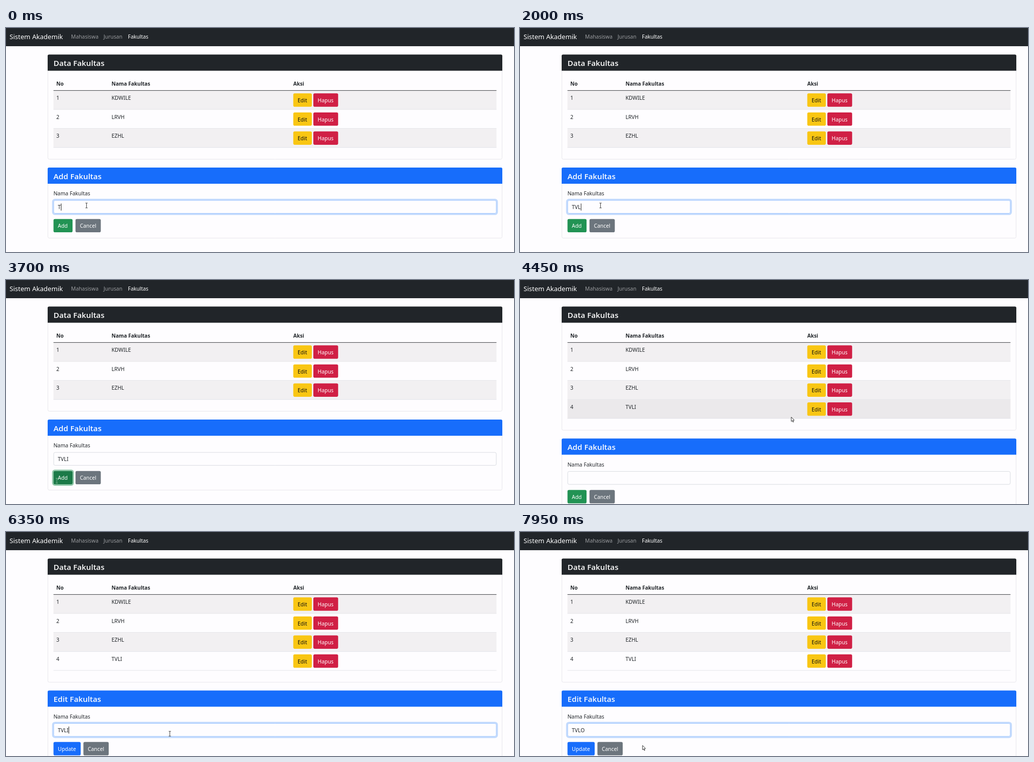
An HTML page with a canvas that plays this animation: 1000 px wide and 443 px high, repeating every 8000 ms.

```html
<!DOCTYPE html>
<html lang="id">
<head>
<meta charset="utf-8">
<title>Sistem Akademik</title>
<style>
  html, body { margin: 0; width: 100%; height: 100%; overflow: hidden; background: #fefdff; }
  canvas { display: block; width: 1000px; height: 443px; }
</style>
</head>
<body>
<canvas id="stage" width="1000" height="443"></canvas>
<script>
const ctx = document.getElementById('stage').getContext('2d');
const LOOP = 8000;
const ROW = 37.6;
const FACULTIES = ['KDWILE', 'LRVH', 'EZHL', 'TVLI'];
const INK = '#212529', BLUE = '#176dfb', GREEN = '#229354';
const RED = '#d02045', YELLOW = '#f9c613', GREY = '#6c757d';
const REGULAR = '10.36px "Noto Sans", sans-serif';
const BOLD = 'bold 10.1px "Noto Sans", sans-serif';
const BRAND = '13.06px "Noto Sans", sans-serif';
const TITLE = '600 15.2px "Open Sans", sans-serif';

// Moments of the user's actions, in ms
const PRESS_ADD = 3550, ROW_ADDED = 4000, EDIT_OPEN = 4850, FOCUS_EDIT = 6050;

// [time, typed value]
const TYPING = [
  [0, 'T'], [700, 'TV'], [1500, 'TVL'], [2250, 'TVLI'], [ROW_ADDED, ''],
  [EDIT_OPEN, 'TVLI'], [6900, 'TVL'], [7250, 'TVLO']
];

// [time, x, y] of the mouse pointer
const PATH = [
  [0, 158.5, 351], [2600, 158.5, 351], [3250, 100, 397], [3950, 100, 397],
  [4400, 533.5, 270.5], [4470, 533.5, 270.5], [4700, 580, 257], [4900, 580, 257],
  [5250, 447.8, 334], [5900, 322.5, 399], [7300, 322.5, 399], [7850, 240.7, 421.5],
  [LOOP, 240.7, 421.5]
];

function pointerAt(t) {
  const i = PATH.findIndex((p, n) => n > 0 && t <= p[0]);
  const [t0, x0, y0] = PATH[i - 1], [t1, x1, y1] = PATH[i];
  const u = (t - t0) / (t1 - t0), e = u * u * (3 - 2 * u);
  return { x: x0 + (x1 - x0) * e, y: y0 + (y1 - y0) * e };
}

const inside = (p, x, y, w, h) => p.x >= x && p.x <= x + w && p.y >= y && p.y <= y + h;

function rect(x, y, w, h, color) {
  ctx.fillStyle = color;
  ctx.fillRect(x, y, w, h);
}

function box(x, y, w, h, r, fill, stroke, line = 1) {
  ctx.beginPath();
  ctx.roundRect(x, y, w, h, r);
  if (fill) { ctx.fillStyle = fill; ctx.fill(); }
  if (stroke) { ctx.strokeStyle = stroke; ctx.lineWidth = line; ctx.stroke(); }
}

function text(str, x, y, color = INK, font = REGULAR) {
  ctx.font = font;
  ctx.fillStyle = color;
  ctx.fillText(str, x, y);
}

function button(label, x, y, w, fill, color = '#fff') {
  box(x, y, w, 26.4, 2.8, fill);
  text(label, x + 8.6, y + 17.6, color);
}

function card(y, h, title, color) {
  box(82.5, y + 0.5, 894, h, 2.8, null, '#e2e1e6', 0.8);
  box(82, y, 895, 32, [2.8, 2.8, 0, 0], color);
  text(title, 93.5, y + 22.5, '#fff', TITLE);
}

function navbar() {
  rect(0, 0, 1000, 36, INK);
  text('Sistem Akademik', 7, 22, '#fff', BRAND);
  text('Mahasiswa', 128, 21, '#9a9c9f');
  text('Jurusan', 192, 21, '#9a9c9f');
  text('Fakultas', 240, 21, '#fff');
}

function table(count, pointer, lightEdit) {
  card(52.5, 206.5 + (count - 3) * ROW, 'Data Fakultas', INK);
  text('No', 99, 114, INK, BOLD);
  text('Nama Fakultas', 207.7, 114, INK, BOLD);
  text('Aksi', 565.5, 114, INK, BOLD);
  for (let i = 0; i < count; i++) {
    const y = 123.7 + i * ROW;
    const hovered = inside(pointer, 93.5, y, 872, ROW);
    if (hovered) rect(93.5, y, 872, ROW, '#ebe9eb');
    else if (i % 2 === 0) rect(93.5, y, 872, ROW, '#f2f0f2');
    rect(93.5, y + ROW - 0.7, 872, 0.8, '#dee0e4');
    text(i + 1, 99, y + 18.5);
    text(FACULTIES[i], 207.7, y + 18.5);
    button('Edit', 565.5, y + 5.6, 36.5, lightEdit && i === 3 ? '#facb24' : YELLOW, '#111');
    button('Hapus', 605, y + 5.6, 48.8, RED);
  }
  rect(93.5, 123.1, 872, 1, '#3d4043');
}

function field(value, y, focused, caretOn) {
  if (focused) box(92.1, y - 1.4, 874.8, 29.2, 4.2, null, '#c2dafd', 2.8);
  box(93.9, y + 0.4, 871.2, 25.6, 2.8, '#fefdff', focused ? '#86b7fe' : '#d0d4da', 0.8);
  text(value, 102, y + 17.6);
  if (focused && caretOn) rect(102.3 + ctx.measureText(value).width, y + 6.5, 1, 14, '#222');
}

function drawIBeam(x, y, color) {
  ctx.strokeStyle = color;
  ctx.lineWidth = 0.9;
  ctx.beginPath();
  for (const s of [-1, 1]) {
    ctx.moveTo(x - 2.2, y + 4.8 * s);
    ctx.lineTo(x + 2.2, y + 4.8 * s);
  }
  ctx.moveTo(x, y - 4.8);
  ctx.lineTo(x, y + 4.8);
  ctx.stroke();
}

function drawShape(x, y, points) {
  ctx.beginPath();
  for (const [dx, dy] of points) ctx.lineTo(x + dx, y + dy);
  ctx.closePath();
  ctx.fillStyle = '#fff';
  ctx.strokeStyle = '#222';
  ctx.lineWidth = 0.9;
  ctx.fill();
  ctx.stroke();
}

const ARROW = [[0.5, 0.5], [0.5, 9.2], [2.5, 7.5], [3.9, 10.6], [5.2, 10], [3.9, 7], [6.4, 6.7]];
const HAND = [[-1, 0], [1, 0], [1, 4], [5, 5], [5, 9], [4, 12], [-1, 12], [-4, 8], [-3, 6], [-1, 8]];

function form(t, shift, pointer) {
  const editing = t >= EDIT_OPEN;
  const [typedAt, value] = TYPING.findLast(k => k[0] <= t);
  const focused = t < PRESS_ADD || t >= FOCUS_EDIT;
  const blinkStart = Math.max(typedAt, t >= FOCUS_EDIT ? FOCUS_EDIT : 0);
  const caretOn = Math.floor((t - blinkStart) / 530) % 2 === 0;
  const y = 276 + shift;

  card(y, 139, editing ? 'Edit Fakultas' : 'Add Fakultas', BLUE);
  text('Nama Fakultas', 93.5, y + 55.4);
  field(value, y + 64.6, focused, caretOn);

  const buttonY = y + 101.7;
  if (editing) {
    button('Update', 93.5, buttonY, 53.5, BLUE);
    button('Cancel', 152.4, buttonY, 49.8, GREY);
    return;
  }
  const overAdd = inside(pointer, 93.5, buttonY, 37.5, 26.4);
  if (t >= PRESS_ADD && t < ROW_ADDED) box(92.1, buttonY - 1.4, 40.3, 29.2, 4.2, null, '#93c9ab', 2.8);
  button('Add', 93.5, buttonY, 37.5, overAdd ? '#1b7a48' : GREEN);
  button('Cancel', 136.8, buttonY, 49.8, GREY);
}

function drawPointer(t, shift, pointer) {
  const { x, y } = pointer;
  const overAdd = t < ROW_ADDED && inside(pointer, 93.5, 377.7, 37.5, 26.4);
  const overEdit = inside(pointer, 565.5, 242, 36.5, 26.4);
  if (overAdd) drawIBeam(x, y, '#7fb596');
  else if (inside(pointer, 93.5, 340.6 + shift, 872, 26.4)) drawIBeam(x, y, '#333');
  else if (overEdit) drawShape(x, y, HAND);
  else drawShape(x, y, ARROW);
}

function draw(now) {
  const t = now % LOOP;
  const pointer = pointerAt(t);
  const count = t < ROW_ADDED ? 3 : 4;
  const shift = (count - 3) * ROW;
  rect(0, 0, 1000, 443, '#fefdff');
  navbar();
  table(count, pointer, t > 4650 && t < 5800);
  form(t, shift, pointer);
  drawPointer(t, shift, pointer);
  requestAnimationFrame(draw);
}
requestAnimationFrame(draw);
</script>
</body>
</html>
```
